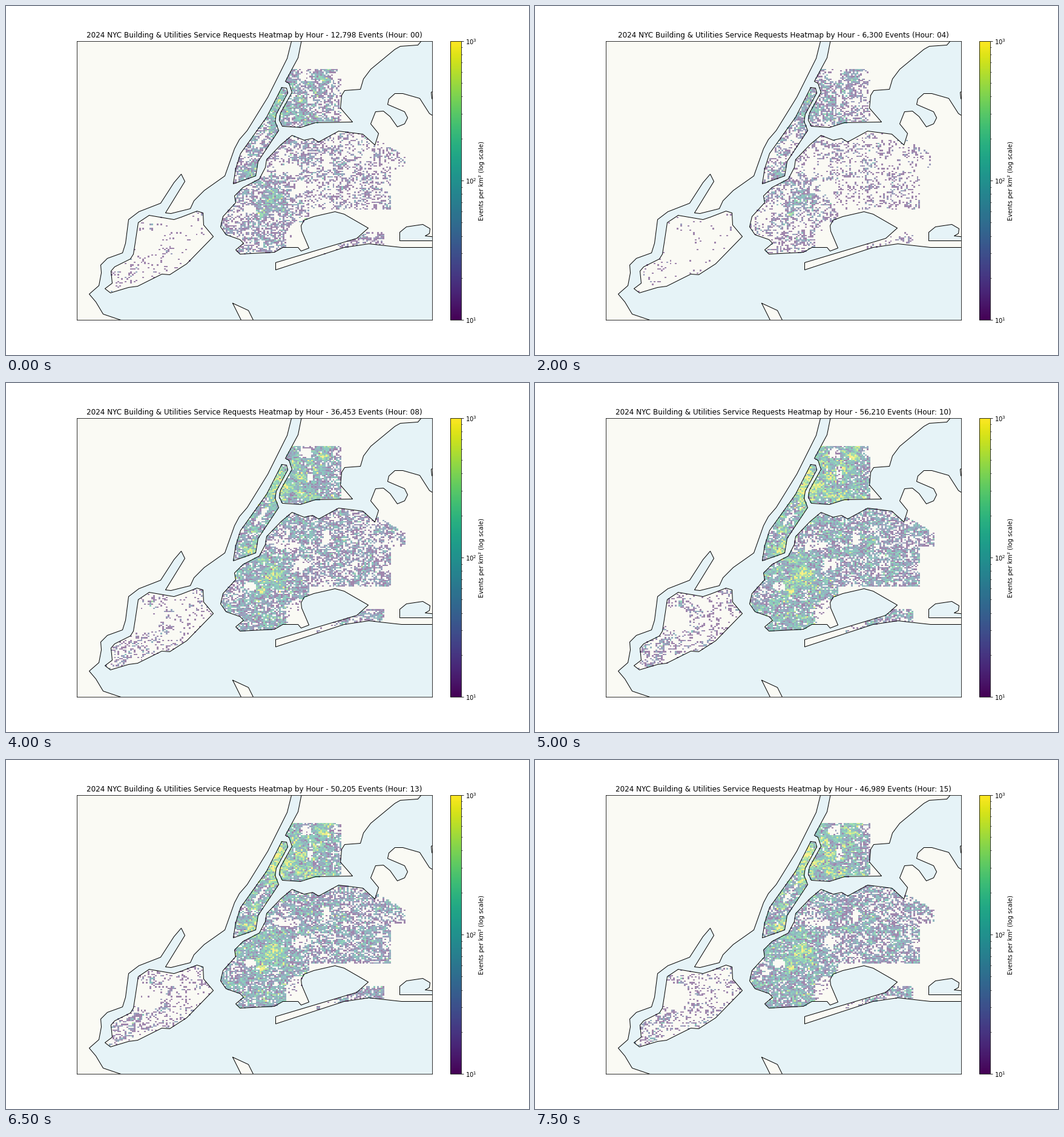
Recreate the animation shown at these times as a matplotlib script. Size 864x576 px, loop 8 s.

```python
import numpy as np
import matplotlib.pyplot as plt
from matplotlib.animation import FuncAnimation
from matplotlib.cm import ScalarMappable
from matplotlib.colors import LogNorm
from matplotlib.path import Path

W, H = 864, 576
HOURS, BINS, CELL_KM2 = 16, 200, 0.0765
LAND, WATER = "#fafaf4", "#e6f3f7"

# Map box in figure fractions, and the same box in stage pixels
X0, X1, Y0, Y1 = 0.1353, 0.8147, 0.1, 0.9
LEFT, RIGHT = X0 * W - 0.5, X1 * W - 0.5
TOP, BOTTOM = (1 - Y1) * H - 0.5, (1 - Y0) * H - 0.5

# Requests at key hours; the hours between follow geometrically
KEY_TOTALS = {0: 12798, 2: 7090, 4: 6300, 6: 13610, 8: 36453,
              10: 56210, 13: 50205, 15: 46989}
TOTALS = np.exp(np.interp(range(HOURS), list(KEY_TOTALS),
                          np.log(list(KEY_TOTALS.values())))).round().astype(int)

# Corner points of the coast
NEW_JERSEY = [
    (475, 40), (471, 58), (464, 86), (432, 150), (398, 205), (385, 220),
    (377, 235), (361, 280), (327, 304), (310, 321), (304, 334), (272, 342),
    (263, 341), (295, 289), (289, 277), (277, 291), (255, 325), (219, 339),
    (202, 352), (197, 391), (192, 407), (167, 416), (156, 427), (157, 440),
    (153, 461), (137, 475), (148, 488), (160, 508), (225, 530), (100, 530), (100, 40)]
STATEN = [
    (236, 345), (277, 352), (289, 348), (315, 338), (325, 341), (326, 361),
    (342, 380), (298, 425), (270, 443), (257, 442), (217, 462), (202, 464),
    (172, 473), (163, 466), (175, 457), (173, 437), (179, 430), (205, 417),
    (210, 409), (213, 390), (218, 357)]
MANHATTAN = [
    (455, 134), (463, 135), (465, 143), (446, 178), (444, 190), (450, 205),
    (416, 256), (412, 280), (375, 293), (379, 268), (387, 243), (430, 183)]
MAINLAND = [
    (491, 40), (482, 85), (461, 124), (467, 127), (472, 142), (453, 176),
    (451, 188), (456, 198), (486, 200), (511, 192), (572, 191), (552, 168),
    (554, 147), (559, 139), (585, 137), (590, 120), (602, 104), (642, 71),
    (651, 66), (680, 64), (700, 40)]
LONG_ISLAND = [
    (720, 190), (699, 177), (683, 152), (655, 144), (642, 144), (632, 153),
    (630, 162), (658, 174), (663, 184), (658, 194), (646, 199), (634, 182),
    (623, 173), (610, 174), (602, 194), (615, 210), (609, 229), (589, 211),
    (549, 206), (516, 224), (506, 218), (492, 221), (472, 213), (454, 228),
    (430, 253), (428, 266), (418, 285), (391, 299), (377, 313), (379, 324),
    (358, 347), (354, 364), (363, 377), (386, 385), (392, 391), (379, 402),
    (386, 409), (443, 406), (457, 398), (482, 398), (487, 404), (500, 399),
    (488, 371), (487, 362), (492, 353), (508, 347), (543, 339), (558, 343),
    (598, 366), (579, 383), (445, 423), (445, 435), (558, 398), (599, 392),
    (653, 398), (720, 398)]
EAST_POINT = [(720, 130), (702, 142), (703, 152), (720, 180)]
SANDY_HOOK = [(374, 490), (400, 502), (414, 530), (394, 530)]
EAST_BAY = [
    (720, 387), (650, 387), (650, 373), (661, 364), (688, 360), (700, 367),
    (699, 375), (692, 379), (720, 382)]
SHORES = [NEW_JERSEY, STATEN, MANHATTAN, MAINLAND, LONG_ISLAND, EAST_POINT, SANDY_HOOK]

# x, y, rx, ry, added requests per cell
HOTSPOTS = [
    (453, 158, 11, 24, 35), (437, 187, 9, 12, 22), (480, 155, 16, 22, 36),
    (523, 116, 8, 14, 18), (512, 170, 14, 12, 10), (428, 338, 5, 9, 30),
    (448, 310, 24, 18, 11), (505, 252, 22, 14, 4), (560, 295, 28, 16, 2.5),
    (605, 382, 20, 6, 5)]
# x, y, rx, ry, slant of parks, cemeteries and yards
GAPS = [
    (421, 219, 4, 15, 0.75), (502, 150, 5, 15, 0), (494, 116, 10, 9, 0),
    (403, 335, 11, 7, 0), (490, 298, 14, 8, 0), (529, 254, 6, 13, 0),
    (465, 267, 22, 6, 0), (484, 382, 22, 26, 0), (232, 390, 22, 22, 0)]

xs = np.linspace(LEFT, RIGHT, BINS + 1)
ys = np.linspace(TOP, BOTTOM, BINS + 1)
gx, gy = np.meshgrid((xs[1:] + xs[:-1]) / 2, (ys[1:] + ys[:-1]) / 2)


def inside(outline):
    points = np.column_stack([gx.ravel(), gy.ravel()])
    return Path(outline).contains_points(points).reshape(gx.shape)


def ellipse(x, y, rx, ry, slant=0):
    dy = gy - y
    return ((gx - x + slant * dy) / rx) ** 2 + (dy / ry) ** 2


def smooth_noise(rng, scale):
    f = np.fft.fftfreq(BINS)
    low = np.exp(-2 * (np.pi * scale) ** 2 * (f[:, None] ** 2 + f ** 2))
    noise = np.fft.ifft2(np.fft.fft2(rng.normal(size=gx.shape)) * low).real
    return noise / noise.std()


def base_rate():
    bronx = inside(MAINLAND) & (gx < 553) & (gy > 103)
    island = inside(LONG_ISLAND) & (gy > 206 + 0.6 * (gx - 590))
    brooklyn = island & (gx < 500) & (gy < 410) & (gx + gy < 860) & (gy > 282)
    queens = island & ~brooklyn & (gy < 336) & (gx < np.where(gy < 268, 660, 636))
    rockaway = island & (gy > 372) & (gx > 512) & (gx < 623)
    areas = [inside(MANHATTAN), bronx, brooklyn, queens, rockaway, inside(STATEN)]
    return np.select(areas, [9, 4, 5, 2.2, 1.5, 0.4])


def request_density():
    rng = np.random.default_rng(311)
    rate = base_rate()
    settled = rate > 0
    for *spot, extra in HOTSPOTS:
        rate += extra * np.exp(-ellipse(*spot) / 2) * settled
    for gap in GAPS:
        rate[ellipse(*gap) < 1] *= 0.03
    rate *= np.exp(0.75 * rng.normal(size=gx.shape) + 0.7 * smooth_noise(rng, 1.8))
    return rate / rate.sum()


DENSITY = request_density()


def heat(hour):
    rng = np.random.default_rng(1000 + hour)
    burst = rng.gamma(3, 1 / 3, DENSITY.shape)
    count = rng.poisson(TOTALS[hour] * DENSITY * burst)
    return np.ma.masked_equal(count / CELL_KM2, 0)


fig = plt.figure(figsize=(W / 72, H / 72), dpi=72, facecolor="white")
ax = fig.add_axes([X0, Y0, X1 - X0, Y1 - Y0])
ax.set(xlim=(LEFT, RIGHT), ylim=(BOTTOM, TOP), xticks=[], yticks=[], facecolor=WATER)

for shore in SHORES + [EAST_BAY]:
    x, y = zip(*shore, shore[0])
    ax.fill(x, y, color=WATER if shore is EAST_BAY else LAND, lw=0, zorder=0)
    ax.plot(x, y, color="black", lw=1, zorder=2)

norm = LogNorm(10, 1000)
mesh = ax.pcolormesh(xs, ys, heat(0), cmap="viridis", norm=norm, alpha=0.5, zorder=1)
title = ax.set_title("", fontsize=12)

cax = fig.add_axes([0.85, Y0, 0.02, Y1 - Y0])
bar = fig.colorbar(ScalarMappable(norm, "viridis"), cax=cax)
bar.set_label("Events per km² (log scale)", fontsize=10)


def update(hour):
    mesh.set_array(heat(hour))
    title.set_text("2024 NYC Building & Utilities Service Requests Heatmap by Hour"
                   f" - {TOTALS[hour]:,} Events (Hour: {hour:02d})")
    return mesh, title


anim = FuncAnimation(fig, update, frames=HOURS, interval=500,
                     repeat=True, repeat_delay=0, blit=False)
plt.show()
```
